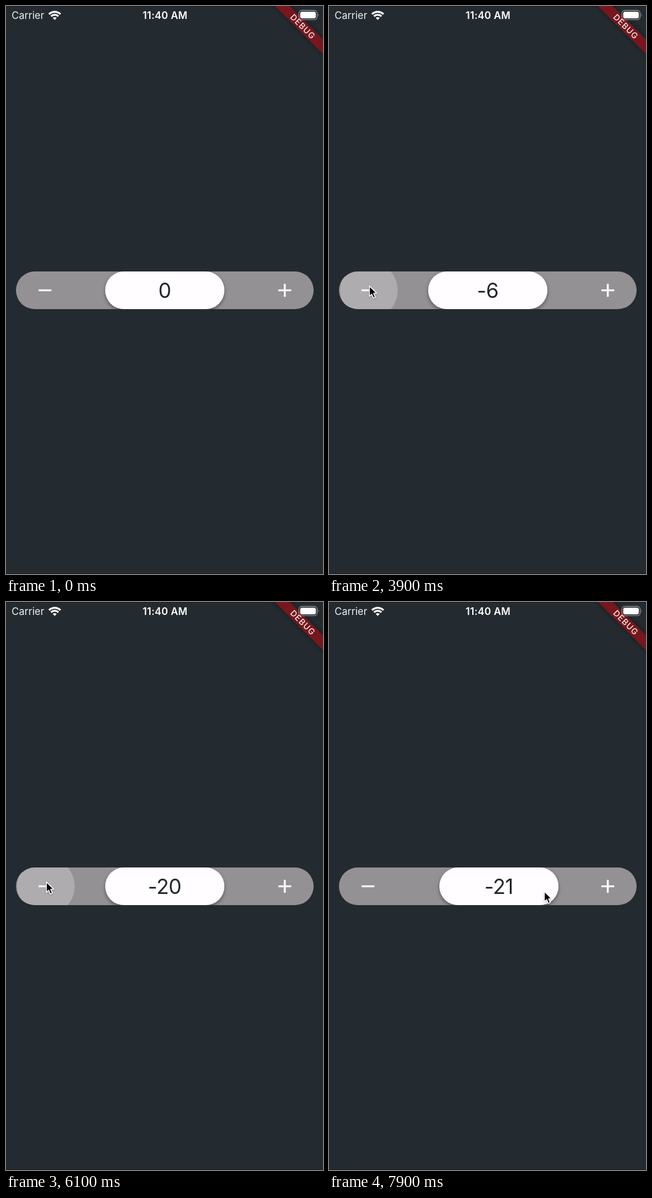
An HTML page that plays this animation: 540 by 965 pixels, repeating every 8000 ms.

```html
<!DOCTYPE html>
<html lang="en">
<head>
<meta charset="utf-8">
<title>Stepper</title>
<style>
  html, body { margin: 0; width: 100%; height: 100%; overflow: hidden; background: #232b30; }
  svg { display: block; width: 100%; height: 100%; }
  text { font-family: Inter, "Liberation Sans", sans-serif; }
</style>
</head>
<body>
<svg viewBox="0 0 540 965">
  <defs>
    <clipPath id="trackClip"><rect x="17" y="451" width="507" height="64" rx="32"/></clipPath>
    <filter id="pillShadow" x="-20%" y="-40%" width="140%" height="180%">
      <feDropShadow dx="0" dy="3" stdDeviation="3.2" flood-color="#000" flood-opacity=".42"/>
    </filter>
    <filter id="bandShadow" x="-20%" y="-100%" width="140%" height="300%">
      <feDropShadow dx="0" dy="0" stdDeviation="4" flood-color="#000" flood-opacity=".5"/>
    </filter>
    <filter id="cursorShadow" x="-50%" y="-50%" width="200%" height="200%">
      <feDropShadow dx="0" dy="1" stdDeviation="1" flood-color="#000" flood-opacity=".35"/>
    </filter>
  </defs>

  <rect width="540" height="965" fill="#232b30"/>
  <path d="M0 .5H540M0 964.5H540" stroke="#171c1f"/>

  <!-- debug ribbon -->
  <g transform="translate(505.4 34.6) rotate(45)">
    <rect x="-90" y="-8.7" width="180" height="17.4" fill="#77191c" filter="url(#bandShadow)"/>
    <text x=".5" y="5.1" font-size="14" font-weight="500" letter-spacing="1" text-anchor="middle" fill="#f6ecec">DEBUG</text>
  </g>

  <!-- status bar -->
  <text x="9.5" y="22" font-size="17" fill="#eef0f1">Carrier</text>
  <text x="271" y="22" font-size="17" font-weight="600" letter-spacing=".2" text-anchor="middle" fill="#fff">11:40 AM</text>
  <g fill="none" stroke="#fff" stroke-width="3.2">
    <path d="M73.2 13.9A13.8 13.8 0 0 1 92.8 13.9"/>
    <path d="M76.7 17.5A8.9 8.9 0 0 1 89.3 17.5"/>
    <path d="M83 23.8L79.6 20.3A4.9 4.9 0 0 1 86.4 20.3Z" fill="#fff" stroke="none"/>
  </g>
  <rect x="499" y="7.5" width="31" height="15.6" rx="4.6" fill="none" stroke="#8d9193" stroke-width="1.3"/>
  <rect x="501.2" y="9.7" width="26.6" height="11.2" rx="3" fill="#fff"/>
  <path d="M531.6 12.8q2 2.5 0 5z" fill="#8d9193"/>

  <!-- stepper -->
  <g clip-path="url(#trackClip)">
    <rect x="17" y="451" width="507" height="64" fill="#949194"/>
    <circle id="highlight" cx="68" cy="483" r="49" fill="#fff"/>
    <circle id="splash" fill="#fff"/>
    <path d="M55.5 483H77.3M463.9 483H485.9M474.9 472V494" stroke="#fff" stroke-width="3.2"/>
    <g id="pill">
      <rect x="169" y="451" width="203" height="64" rx="32" fill="#fffdff" filter="url(#pillShadow)"/>
      <text id="count" x="270.3" y="495.7" font-size="35" letter-spacing="-.5" text-anchor="middle" fill="#22272b"></text>
    </g>
  </g>

  <g id="cursor" filter="url(#cursorShadow)">
    <path d="M.8 .8V18.2L4.8 14.5L7.6 21L10.9 19.6L8.1 13.2L13 12.8Z"
          fill="#000" stroke="#fff" stroke-width="1.5" stroke-linejoin="round"/>
  </g>
</svg>
<script>
const LOOP = 8000, STEP = 100;
const PRESS = 2480, RELEASE = 6420;
const el = id => document.getElementById(id);
const clamp = v => Math.max(0, Math.min(1, v));
const mix = (a, b, p) => a + (b - a) * p;

// Moments of single taps, the first hold tick and the last tick.
const taps = [1400, 1900, 2300, 2500];

// Keys: time, x, y
const cursorKeys = [
  [100, 45, 555], [200, 31, 543], [300, 20, 533], [500, 20, 533],
  [700, 30, 520], [900, 56, 488], [1100, 68, 475], [6500, 68, 475],
  [6700, 84, 520], [6900, 150, 567], [7100, 245, 540], [7300, 322, 490],
  [7400, 396, 487], [7500, 476, 486], [7600, 448, 488], [7900, 366, 491]
];
// Keys: time, offset
const pillKeys = [[7300, 0], [7400, 33], [7500, 70], [7600, 57], [7900, 19]];

function sample(keys, t) {
  if (t <= keys[0][0]) return keys[0].slice(1);
  const i = keys.findIndex(k => k[0] >= t);
  if (i < 0) return keys[keys.length - 1].slice(1);
  const a = keys[i - 1], b = keys[i], p = (t - a[0]) / (b[0] - a[0]);
  return a.slice(1).map((v, j) => mix(v, b[j + 1], p));
}

function countAt(t) {
  if (t >= 6300) return -21;
  if (t >= 5000) return -9 - Math.min(11, Math.floor((t - 5000) / 100));
  if (t >= 2500) return -4 - Math.floor((t - 2500) / 500);
  return -taps.filter(tap => t >= tap).length;
}

function draw(t) {
  const fade = 1 - clamp((t - RELEASE) / 250);
  const grow = clamp((t - PRESS) / 1000);
  el("highlight").setAttribute("opacity", .112 * clamp((t - PRESS) / 200) * fade);

  const splash = el("splash");
  splash.setAttribute("cx", 68);
  splash.setAttribute("cy", mix(478, 483, grow));
  splash.setAttribute("r", 49 * grow);
  splash.setAttribute("opacity", .147 * fade);

  const count = countAt(t);
  el("count").textContent = count ? "-" + -count : "0";
  el("pill").setAttribute("transform", `translate(${sample(pillKeys, t)[0]} 0)`);

  const [x, y] = sample(cursorKeys, t);
  const cursor = el("cursor");
  cursor.setAttribute("transform", `translate(${x} ${y})`);
  cursor.setAttribute("visibility", t < 100 ? "hidden" : "visible");
}

let start;
function frame(now) {
  start ??= now;
  draw(Math.floor(((now - start) % LOOP) / STEP) * STEP);
  requestAnimationFrame(frame);
}
draw(0);
requestAnimationFrame(frame);
</script>
</body>
</html>
```
